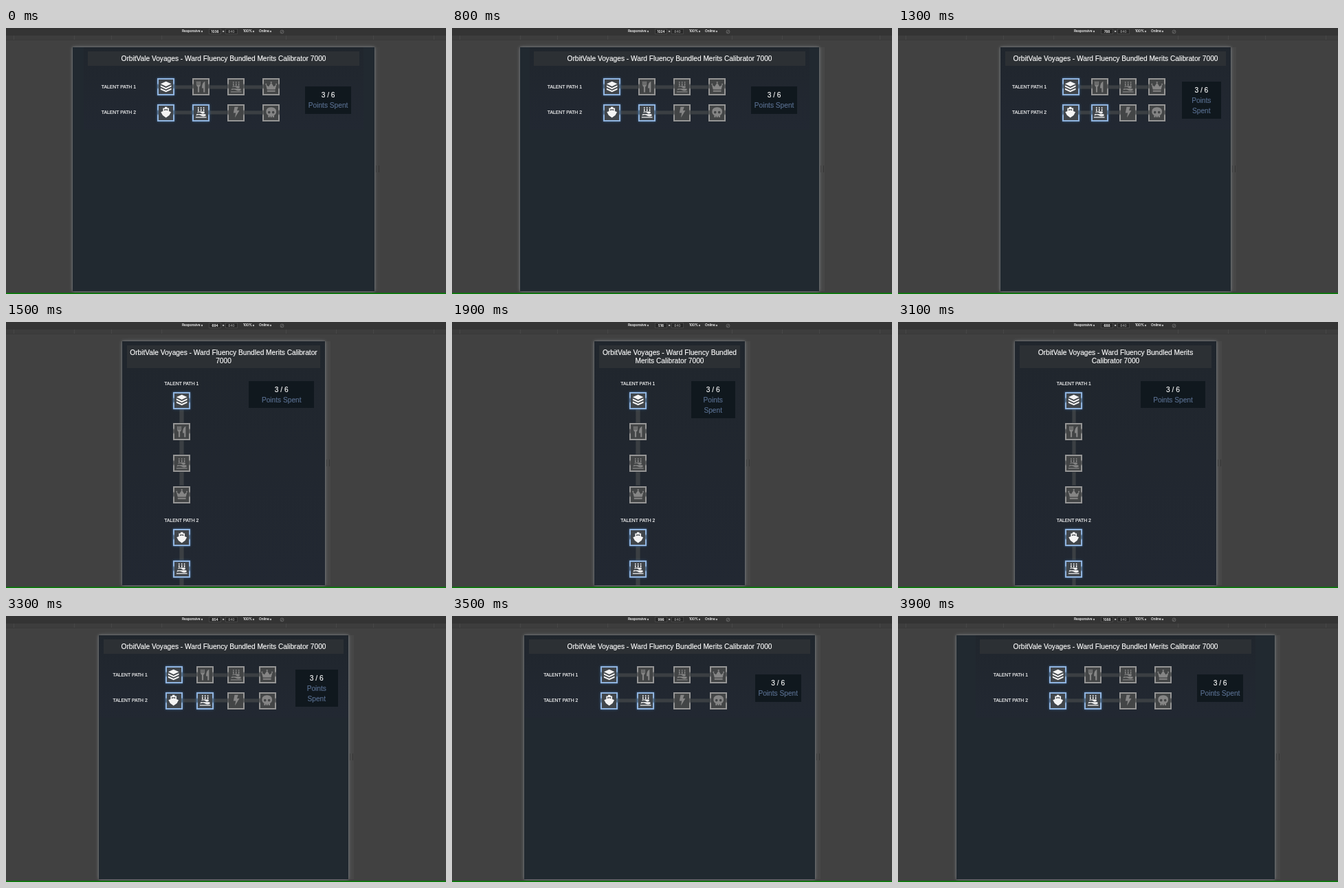
Recreate the animation shown at these times as an HTML page. Size 640 by 387 pixels, loop 4.2 s.

```html
<!DOCTYPE html>
<html lang="en">
<head>
<meta charset="utf-8">
<title>Talent calculator, responsive view</title>
<style>
html, body { margin: 0; width: 100%; height: 100%; overflow: hidden; background: #414141; }
#stage {
  position: relative; width: 640px; height: 387px; overflow: hidden;
  background: #414141; color: #fff;
  font-family: "Liberation Sans", Arial, sans-serif;
  -webkit-text-stroke: .15px currentColor;
}
#stage div, #stage span, #stage svg { position: absolute; box-sizing: border-box; }

#bar { left: 0; top: 0; width: 640px; height: 11px; background: #343434; }
#bar span {
  top: 1.2px; line-height: 7.5px; font-size: 4.9px; white-space: nowrap;
  color: #f0f0f0; font-family: Inter, sans-serif;
}
#bar .num { width: 18px; height: 8px; background: #282828; border: .5px solid #454545; text-align: center; line-height: 7px; }
#bar .off { color: #909090; }
#bar .menu::after {
  content: ""; position: absolute; left: 100%; top: 2.4px; margin-left: 1.5px;
  border: 1.7px solid transparent; border-top: 3px solid #f0f0f0; border-bottom: 0;
}
#reload { left: 397.5px; top: 1.5px; }
#ruler { left: 0; top: 11px; width: 640px; height: 7px; background: #3d3d3d; border-bottom: 1px solid #393939; }
#ruler div { top: 0; width: 1px; height: 6px; background: #474747; }
#foot { left: 0; top: 385px; width: 640px; height: 2px; background: linear-gradient(#245224, #0a7c0a 50%); }

#grip { top: 28px; width: 8px; height: 355px; background: #434343; }
#grip.hover { background: #474747; }
#grip::after {
  content: ""; position: absolute; left: 2px; top: 172px; width: 3px; height: 10px;
  border: solid #353535; border-width: 0 1px;
}
#view { top: 28px; height: 355px; overflow: hidden; background: #212930; }
#halo { top: 28px; height: 355px; box-shadow: 0 0 1px #858b91, 0 0 5px rgba(205, 212, 220, .45); }
#page { top: 0; background: linear-gradient(#20262d, #222832); }
#title {
  top: 6px; padding: 4.6px 3.4px; background: #2c3034; text-align: center;
  font-size: 10.19px; line-height: 12px;
}
#points {
  padding: 4.8px 4px; background: #10181e; text-align: center;
  font-size: 10.19px; line-height: 15.2px; color: #596f90;
}
#points b { display: block; font-weight: 400; color: #fff; }
.label { font-size: 6.8px; line-height: 8px; white-space: nowrap; }
.link { background: #3b3f43; border: .6px solid #30363b; }
.rune {
  --rim: #959595; --gap: #56585a;
  width: 25px; height: 25px; background: #434546; color: #858585;
  border: 2px solid;
  border-image: linear-gradient(var(--rim) 30%, var(--gap) 40% 55%, var(--rim) 65%) 2;
}
.rune svg { left: 1.8px; top: 1.8px; width: 17.4px; height: 17.4px; fill: currentColor; fill-rule: evenodd; }
.rune.on { --rim: #8fb3de; --gap: #54718f; background: #41464b; color: #f4f4f4; box-shadow: 0 0 3px #47709f; }
</style>
</head>
<body>
<div id="stage">
  <div id="bar">
    <span class="menu" style="left:256px">Responsive</span>
    <span class="num" id="width" style="left:295px">1036</span>
    <span style="left:314.5px">×</span>
    <span class="num off" style="left:319px">840</span>
    <span class="menu" style="left:345px">100%</span>
    <span class="menu" style="left:368px">Online</span>
    <svg id="reload" width="7" height="7" viewBox="0 0 7 7" fill="none" stroke="#777">
      <circle cx="3.5" cy="3.5" r="2.4" stroke-width=".8"/><path d="M2.5 4.5 4.5 2.5"/>
    </svg>
  </div>
  <div id="ruler"></div>
  <div id="grip"></div>
  <div id="halo"></div>
  <div id="view">
    <div id="page"></div>
    <div id="title">OrbitVale Voyages - Ward Fluency Bundled Merits Calibrator 7000</div>
    <div id="points"><b>3 / 6</b>Points Spent</div>
  </div>
  <div id="foot"></div>
</div>
<script>
const $ = id => document.getElementById(id);
const SCALE = 0.4247, MID = 316.5, TOP = 28, LOOP = 4200, STEP = 100;
const RUNE = 25, LINK = 6.5, LINE = 15.2;

// Key points of the drag: time in ms, viewport width in CSS pixels.
const DRAG = [
  [700, 1036], [1300, 788], [1900, 516], [2200, 478], [2300, 478],
  [2900, 555], [3100, 688], [3500, 996], [3900, 1088]
];

// Icon path helpers on a 20 x 20 grid.
const rect = (x, y, w, h) => `M${x} ${y}h${w}v${h}h${-w}z`;
const disc = (x, y, r) => `M${x - r} ${y}a${r} ${r} 0 1 0 ${2 * r} 0a${r} ${r} 0 1 0 ${-2 * r} 0z`;
const sheet = y => `M1 ${y}l9 4.2 9-4.2v2.6l-9 4.2-9-4.2z`;
const candle = x => rect(x - 0.8, 4, 1.6, 4) + disc(x, 2.2, 1);
const tier = (x, y, w, h) => `M${x} ${y + 1.5}q0-1.5 1.5-1.5h${w - 3}q1.5 0 1.5 1.5v${h - 1.5}q${-w / 4} 2.5 ${-w / 2} 0t${-w / 2} 0z`;

const ICONS = {
  stack: 'M10 1l9 4-9 4.2-9-4.2z' + sheet(7.2) + sheet(12),
  cutlery: [2.5, 5, 7.5].map(x => rect(x, 1, 1.5, 6)).join('') + 'M2.5 7H9q0 2-2 3v9H4.5v-9q-2-1-2-3zM16.5 1v18H14v-7h-2.5q0-9 5-11z',
  cake: [5.5, 10, 14.5].map(candle).join('') + tier(4, 8.5, 12, 2.5) + tier(2, 13, 16, 2.5) + rect(1, 17.5, 18, 1.5),
  crown: 'M1 6l4.7 3.5L10 3l4.3 6.5L19 6l-2.2 8.5H3.2z' + rect(3.2, 15.7, 13.6, 2.3) + [1.5, 18.5].map(x => disc(x, 5.5, 1.2)).join('') + disc(10, 2.5, 1.3),
  ship: rect(8, 1, 4, 2) + 'M5 3h10v5l3.5 1.5-3 5.5-5.5 4-5.5-4-3-5.5L5 8zM7 5v2.3L10 6l3 1.3V5z',
  bolt: 'M7.5 1h6l-2 6h4L8 19l1.5-8h-4z',
  skull: 'M5 15q-3.5-2-3.5-6 0-7.5 8.5-7.5T18.5 9q0 4-3.5 6v3.5H5z' + [6.6, 13.4].map(x => disc(x, 10, 2.1)).join('') + [7.5, 11.2].map(x => rect(x, 16.5, 1.3, 2)).join('')
};
const PATHS = [
  { icons: ['stack', 'cutlery', 'cake', 'crown'], spent: 1 },
  { icons: ['ship', 'cake', 'bolt', 'skull'], spent: 2 }
];

function add(parent, cls, html = '') {
  const el = document.createElement('div');
  el.className = cls;
  el.innerHTML = html;
  return parent.appendChild(el);
}

function place(el, box) {
  for (const k in box) el.style[k] = box[k] + 'px';
}

for (const px of [425, 768, 1024, 1440])
  for (const side of [-1, 1]) place(add($('ruler'), ''), { left: MID + side * px * SCALE / 2 });

PATHS.forEach((path, n) => {
  path.label = add($('view'), 'label', 'TALENT PATH ' + (n + 1));
  path.links = path.icons.slice(1).map(() => add($('view'), 'link'));
  path.runes = path.icons.map((name, i) => add($('view'), i < path.spent ? 'rune on' : 'rune',
    `<svg viewBox="0 0 20 20"><path d="${ICONS[name]}"/></svg>`));
});

// Runes centred from (x, y) on, joined by links, along a row or a column.
function chain(path, x, y, gap, row) {
  const half = RUNE / 2, dx = row ? gap : 0, dy = row ? 0 : gap;
  path.runes.forEach((el, i) => place(el, { left: x + i * dx - half, top: y + i * dy - half }));
  path.links.forEach((el, i) => place(el, {
    left: x + i * dx + (row ? half : -LINK / 2),
    top: y + i * dy + (row ? -LINK / 2 : half),
    width: row ? gap - RUNE : LINK,
    height: row ? LINK : gap - RUNE
  }));
}

const pointsHeight = w => (w < 66 ? 3 : 2) * LINE + 8.8;

function layoutWide(left, w) {
  const gap = w / 8, first = left + 0.4356 * w + 19 - 1.5 * gap;
  PATHS.forEach((path, n) => {
    const y = 85.8 - TOP + n * 37.4;
    place(path.label, { left: left + 0.128 * w - 26, top: y - 4 });
    chain(path, first, y, gap, true);
  });
  const width = Math.min(66.5, 0.17 * w), height = pointsHeight(width);
  place($('points'), { left: left + 0.873 * w - width / 2, top: 105 - TOP - height / 2, width, height });
}

function layoutTall(w) {
  const x = 0.301 * w - 2.4;
  PATHS.forEach((path, n) => {
    const y = 90 - TOP + n * 199.4;
    place(path.label, { left: x - 25.2, top: y - 4 });
    chain(path, x, y + 24.2, 45.6, false);
  });
  const left = 0.574 * w + 14.9, width = 0.983 * w - 10.6 - left;
  place($('points'), { left, top: 86 - TOP, width, height: pointsHeight(width) });
}

function layout(px) {
  const vw = px * SCALE, left = MID - vw / 2;
  const w = (px >= 1024 ? 960 : px) * SCALE, inset = (vw - w) / 2;
  const wide = px >= 768;
  $('width').textContent = px;
  place($('view'), { left, width: vw });
  place($('halo'), { left, width: vw });
  place($('grip'), { left: left + vw });
  place($('page'), { left: inset, width: w, height: wide ? 120 : 355 });
  place($('title'), { left: inset + 6.8, width: w - 13.6 });
  if (wide) layoutWide(inset, w); else layoutTall(w);
}

// Smooth curve through the key points, at rest at both ends.
function widthAt(t) {
  const last = DRAG.length - 1;
  if (t <= DRAG[0][0]) return DRAG[0][1];
  if (t >= DRAG[last][0]) return DRAG[last][1];
  const slope = i => i % last ? (DRAG[i + 1][1] - DRAG[i - 1][1]) / (DRAG[i + 1][0] - DRAG[i - 1][0]) : 0;
  const i = DRAG.findIndex(p => p[0] > t) - 1;
  const [[t0, a], [t1, b]] = [DRAG[i], DRAG[i + 1]];
  const d = t1 - t0, u = (t - t0) / d, v = 1 - u;
  return Math.round(a + (b - a) * u * u * (3 - 2 * u) + d * u * v * (slope(i) * v - slope(i + 1) * u));
}

let shown = 0;
function frame() {
  const t = Math.floor(performance.now() % LOOP / STEP) * STEP;
  const px = widthAt(t);
  $('grip').className = t >= 400 ? 'hover' : '';
  if (px !== shown) layout(shown = px);
  requestAnimationFrame(frame);
}
frame();
</script>
</body>
</html>
```
